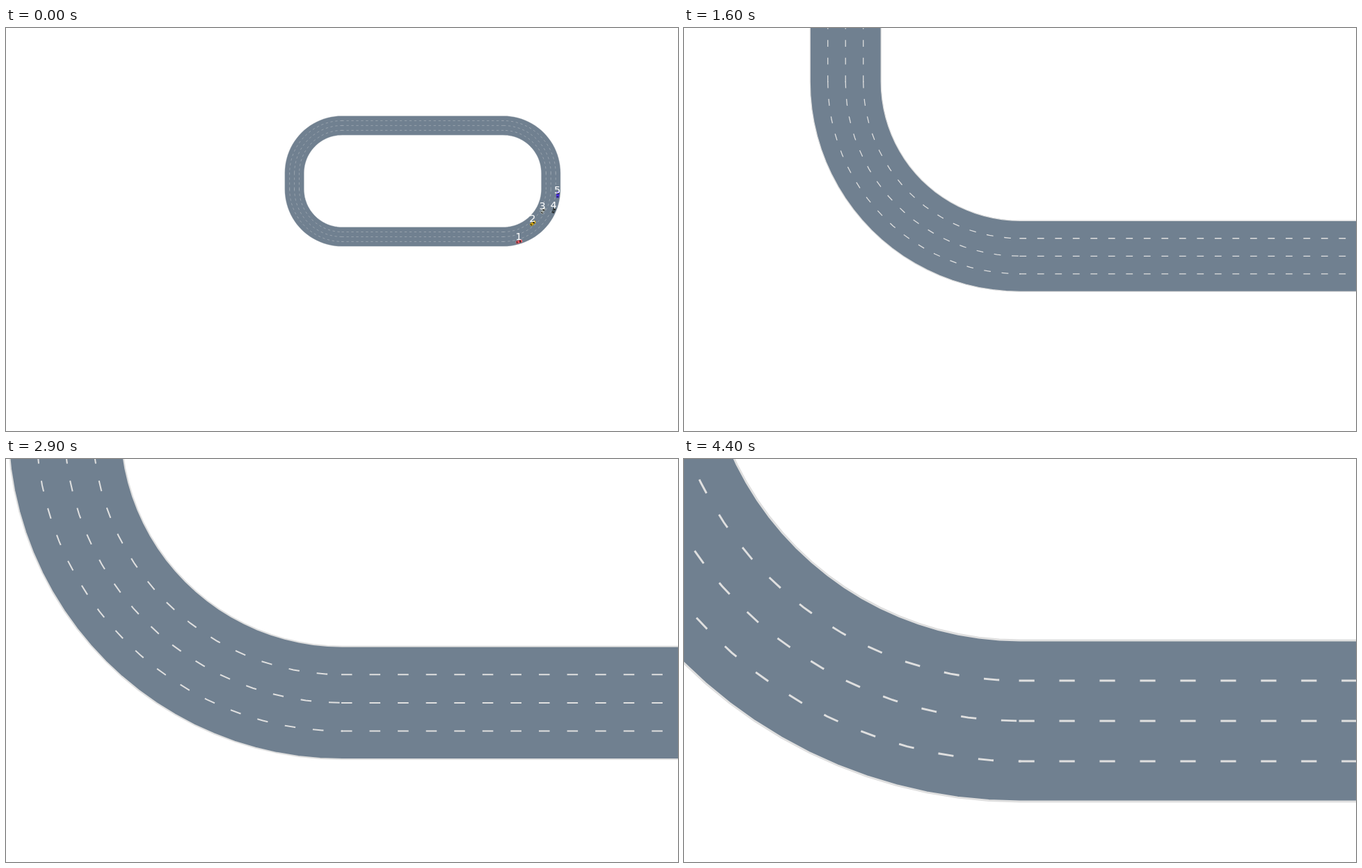
An HTML page with a canvas for the animation above (10 s loop, 966x580 px).

```html
<!DOCTYPE html>
<html lang="en">
<head>
<meta charset="utf-8">
<title>Zoom onto a stadium track</title>
<style>
  html, body { margin: 0; width: 100%; height: 100%; overflow: hidden; background: #fff; }
  canvas { display: block; width: 966px; height: 580px; }
</style>
</head>
<body>
<canvas id="stage" width="966" height="580"></canvas>
<script>
const W = 966, H = 580;
const LOOP = 10000, TICK = 100, ZOOM_TICKS = 44;

// Track in metres, y up, driven counter-clockwise.
const LENGTH = 100, SIDE = 10, MID = 25;   // straights, and height of the lower turn centres
const LANE = 3, INNER = 23.5, FACETS = 24;
const QUARTER = Math.PI / 2;
const SPEED = 10;

const ctx = document.getElementById('stage').getContext('2d');

const turns = [
  { x: LENGTH, y: MID, from: -QUARTER },
  { x: LENGTH, y: MID + SIDE, from: 0 },
  { x: 0, y: MID + SIDE, from: QUARTER },
  { x: 0, y: MID, from: 2 * QUARTER }
];

const cars = [
  { lane: 4, s: 10, color: '#e0525c' },
  { lane: 2, s: 20, color: '#c9a011' },
  { lane: 2, s: 30, color: '#a3aaa6' },
  { lane: 4, s: 40, color: '#46545c' },
  { lane: 4, s: 50, color: '#4a2fe0' }
];

function turnPoints(turn, r) {
  return Array.from({ length: FACETS + 1 }, (_, i) => {
    const a = turn.from + QUARTER * i / FACETS;
    return [turn.x + r * Math.cos(a), turn.y + r * Math.sin(a)];
  });
}

function trace(points) {
  points.forEach(([x, y], i) => i ? ctx.lineTo(x, y) : ctx.moveTo(x, y));
}

function strokeRing(r, color, width) {
  ctx.beginPath();
  trace(turns.flatMap(turn => turnPoints(turn, r)));
  ctx.closePath();
  ctx.strokeStyle = color;
  ctx.lineWidth = width;
  ctx.stroke();
}

// Dashes start afresh on every turn and every straight.
function strokeDashes(r) {
  const arcs = turns.map(turn => turnPoints(turn, r));
  ctx.setLineDash([1, 2]);
  arcs.forEach((arc, i) => {
    ctx.beginPath();
    trace(arc);
    ctx.stroke();
    ctx.beginPath();
    trace([arc[FACETS], arcs[(i + 1) % 4][0]]);
    ctx.stroke();
  });
  ctx.setLineDash([]);
}

function drawTrack() {
  ctx.lineJoin = 'miter';
  ctx.lineCap = 'square';
  strokeRing(INNER + 2 * LANE, '#708090', 4 * LANE);
  strokeRing(INNER, '#dfdfdf', 0.15);
  strokeRing(INNER + 4 * LANE, '#dfdfdf', 0.15);
  for (let i = 1; i < 4; i++) strokeDashes(INNER + i * LANE);
}

// Pose on the lower right turn and the short straight after it.
function pose(lane, s) {
  const r = INNER + (lane - 0.5) * LANE;
  const a = Math.min(s / r, QUARTER);
  return {
    x: LENGTH + r * Math.sin(a),
    y: MID - r * Math.cos(a) + Math.max(0, s - r * QUARTER),
    a
  };
}

function box(color, x, y, w, h, r) {
  ctx.fillStyle = color;
  ctx.beginPath();
  ctx.roundRect(x, y, w, h, r);
  ctx.fill();
}

function drawCar(p, color) {
  ctx.save();
  ctx.translate(p.x, p.y);
  ctx.rotate(p.a);
  box(color, -2, -0.9, 4, 1.8, 0.5);
  box('#222', 0.3, -0.7, 0.75, 1.4, 0.2);
  box('#222', -1.6, -0.65, 0.5, 1.3, 0.2);
  box('#eee', 1.7, -0.75, 0.25, 0.4, 0.1);
  box('#eee', 1.7, 0.35, 0.25, 0.4, 0.1);
  ctx.restore();
}

function draw(time) {
  const tick = Math.floor(time % LOOP / TICK);
  const zoom = 2.4 + 0.4 * Math.min(tick, ZOOM_TICKS);
  const sx = zoom * W / 1000, sy = zoom * H / 600;

  ctx.setTransform(1, 0, 0, 1, 0, 0);
  ctx.fillStyle = '#fff';
  ctx.fillRect(0, 0, W, H);

  ctx.setTransform(sx, 0, 0, -sy, W / 2, H / 2);
  drawTrack();

  if (tick > 8) return;   // cars have left the view
  const poses = cars.map(car => pose(car.lane, car.s + SPEED * tick * TICK / 1000));
  poses.forEach((p, i) => drawCar(p, cars[i].color));

  ctx.setTransform(1, 0, 0, 1, 0, 0);
  ctx.font = '14.5px "DejaVu Sans", sans-serif';
  ctx.textAlign = 'center';
  ctx.fillStyle = '#fff';
  poses.forEach((p, i) => {
    ctx.fillText(i + 1, W / 2 + p.x * sx - 0.6, H / 2 - p.y * sy - 2);
  });
}

const start = performance.now();
function loop() {
  draw(performance.now() - start);
  requestAnimationFrame(loop);
}
loop();
</script>
</body>
</html>
```
